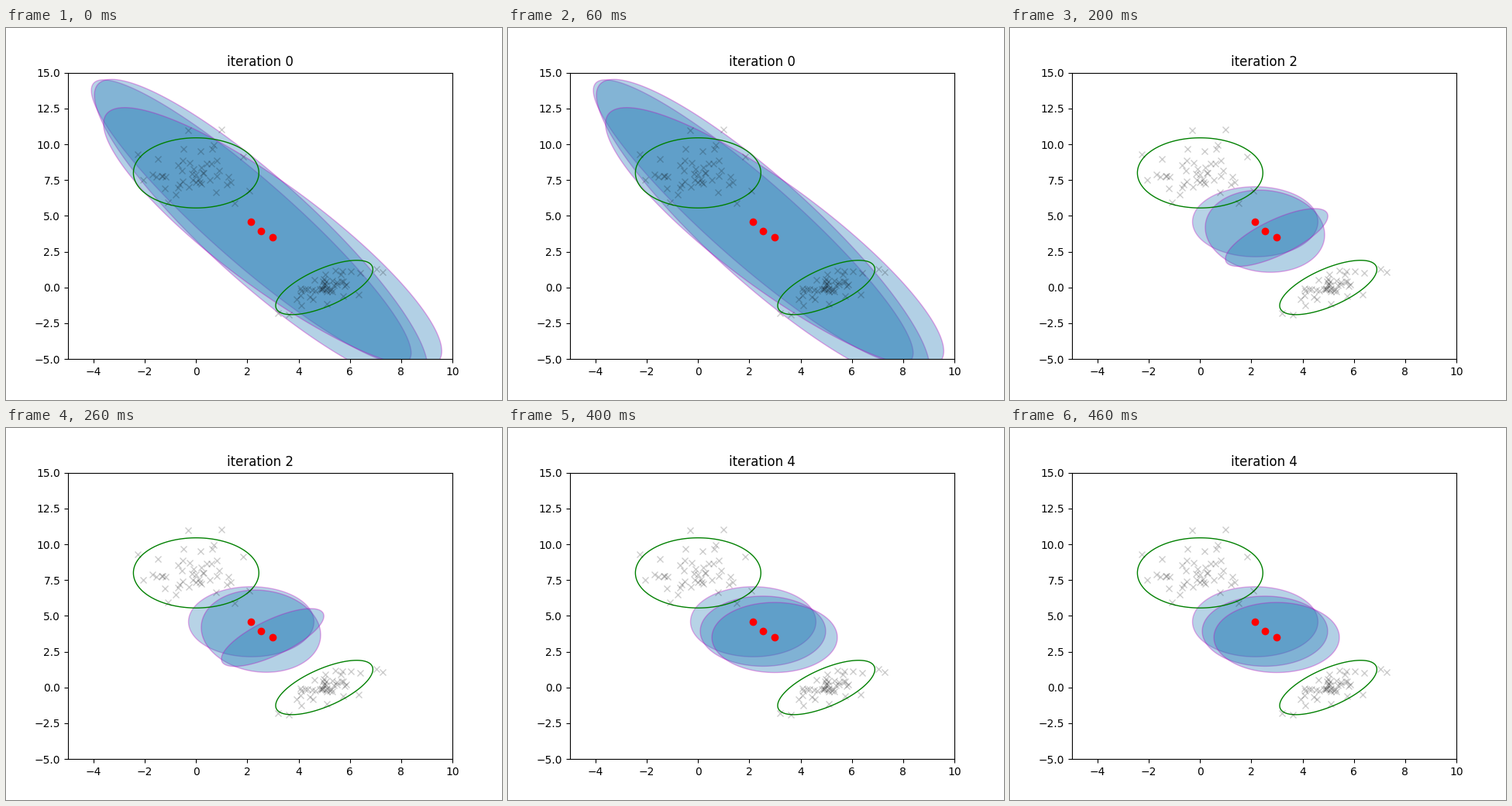
A matplotlib script that plays this animation: 640x480 px, repeating every 500 ms.

```python
import numpy as np
import matplotlib.pyplot as plt
from matplotlib.animation import FuncAnimation
from matplotlib.patches import Polygon

plt.rcParams["text.kerning_factor"] = 6

R95 = 2.4477  # radius of the 95 % region of a unit normal
MEANS = [(2.15, 4.59), (2.53, 3.93), (2.985, 3.49)]
WEIGHTS = [0.32, 0.338, 0.342]
UNIT = (R95, R95, 0)

# Per iteration, each component's half width, half height and correlation
STEPS = [
    [(6.24, 9.91, -0.925), (6.5, 10.6, -0.895), (6.6, 9.07, -0.875)],
    [(6.62, 10.15, -0.9), (0.24, 0.38, 0.8), (0.9, 0.79, 0.7)],
    [UNIT, (2.33, 2.87, -0.09), (2.0, 2.02, 0.74)],
    [UNIT, (5.83, 6.29, -0.86), (1.36, 1.81, 0.63)],
    [UNIT, UNIT, UNIT],
]

# True clusters: center, 95 % shape and the samples lying far out
CLUSTERS = [
    ((0, 8), UNIT,
     [(-0.3, 11), (1, 11.05), (-2.27, 9.3), (-2.07, 7.5),
      (2.08, 6.75), (-1.1, 5.95), (1.5, 5.9)]),
    ((5, 0), (1.896, 1.896, 2 / 3),
     [(3.2, -1.8), (3.62, -1.9), (4.1, -1.25), (5.75, -0.6),
      (5.43, 1.18), (7.05, 1.3), (7.28, 1.07)]),
]


def correlate(center, shape, u, v):
    half_w, half_h, rho = shape
    v = rho * u + np.sqrt(1 - rho ** 2) * v
    return np.column_stack([center[0] + half_w * u, center[1] + half_h * v])


def outline(center, shape):
    t = np.linspace(0, 2 * np.pi, 240, endpoint=False)
    return correlate(center, shape, np.cos(t), np.sin(t))


def samples(rng, center, shape, outliers, inner=42, spread=0.33):
    u, v = rng.normal(0, spread, (2, inner))
    return np.vstack([correlate(center, shape, u, v), outliers])


rng = np.random.default_rng(4)
fig, ax = plt.subplots(figsize=(6.4, 4.8), dpi=100)
ax.set_xlim(-5, 10)
ax.set_ylim(-5, 15)
title = ax.set_title("iteration 0")

regions = [
    ax.add_patch(Polygon(outline(mean, shape), facecolor="C0", edgecolor="m",
                         linewidth=1, alpha=weight))
    for mean, shape, weight in zip(MEANS, STEPS[0], WEIGHTS)
]

for center, shape, outliers in CLUSTERS:
    ax.plot(*samples(rng, center, shape, outliers).T, "kx", alpha=0.2)
    ax.add_patch(Polygon(outline(center, shape), fill=False,
                         edgecolor="g", linewidth=1))

ax.plot(*zip(*MEANS), "ro")


def update(i):
    title.set_text(f"iteration {i}")
    for region, mean, shape in zip(regions, MEANS, STEPS[i]):
        region.set_xy(outline(mean, shape))
    return [title, *regions]


anim = FuncAnimation(fig, update, frames=len(STEPS), interval=100,
                     repeat=True, repeat_delay=0)
plt.show()
```
